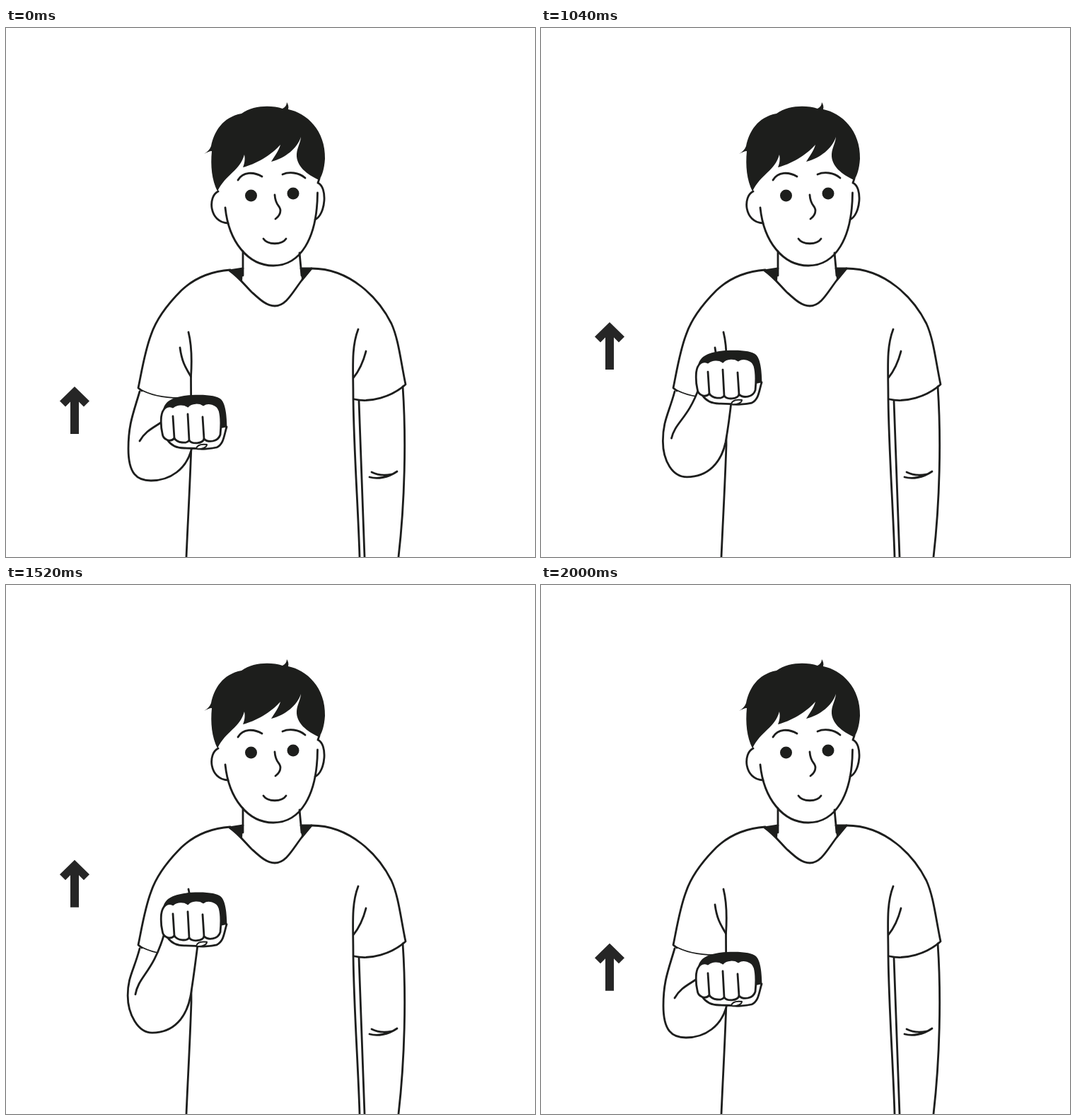
An HTML page for the animation above (3.04 s loop, 748 px wide and 748 px high).

```html
<!DOCTYPE html>
<html lang="en">
<head>
<meta charset="utf-8">
<title>Raising a fist</title>
<style>
  html, body { margin: 0; width: 100%; height: 100%; overflow: hidden; background: #fff; }
  svg { display: block; width: 100%; height: 100%; }
  .line { fill: none; stroke: #1d1e1d; stroke-width: 2.8; stroke-linecap: round; stroke-linejoin: round; }
  .white { fill: #fff; }
  .ink { fill: #1d1e1c; }
  .thin { stroke-width: 1.6; }
</style>
</head>
<body>
<svg viewBox="0 0 748 748">
  <!-- head -->
  <g class="line">
    <path d="M300 231C285 238 287 275 314 276"/>
    <path d="M443 213L441 219C455 225 452 264 437 271"/>
    <path d="M310 254C315 302 342 336 378 336C416 336 440 298 440.500 233"/>
    <path d="M328 215C335 203 350 203 362 210M391 207C400 203 414 204 423 212"/>
    <path d="M380 236C381 252 388 251 388 258C388 264 385 267 381 270"/>
    <path d="M364 298C370 307 390 307 396 298"/>
    <path d="M335 316V350M415 318L418 350"/>
  </g>
  <g class="ink">
    <path d="M280 178C285 175 288 172 290 167C294 147 306 126 333 121C350 109 375 109 391 114C395 112 397 109 397 105C399 108 400 111 399 115C425 120 452 145 451 185C450 200 447 208 443 215C425 207 410 195 411 178C412 168 416 164 417 154C412 170 395 184 375 189C380 181 386 173 388 165C375 180 352 193 335 197C338 190 338 184 337 179C331 202 311 206 299 231C291 215 289 195 291 174C288 174 284 176 280 178Z"/>
    <circle cx="346.500" cy="237" r="8.500"/>
    <circle cx="406" cy="234" r="8.500"/>
    <path d="M316 343L335 340L334 358C328 352 322 347 316 343ZM417 339L432 340L418 357Z"/>
  </g>

  <!-- shirt and resting arm -->
  <g class="line">
    <path d="M335 340L316 343C330 353 338 364 347 373C358 383 368 393 380 393C396 393 405 374 418 357L432 340H417"/>
    <path d="M317 342C290 344 266 354 248 371C228 391 212 413 205 434C196 458 192 485 187 509L192 513"/>
    <path d="M432 340C487 340 527 382 545 418C555 440 558 470 565 504C545 522 515 530 493 525"/>
    <path d="M498 426C488 452 491 480 491 525C492 600 498 680 500 748M509 457C505 473 499 485 491 495"/>
    <path d="M499 527L507 748M561 507C566 580 564 670 555 748"/>
    <path d="M514 635C525 638 540 636 553 627M517 628C525 632 535 633 545 631"/>
    <path d="M258 430C263 450 263 470 261.500 493L262 590C260 650 257 700 255 748"/>
    <path d="M246 452C249 475 256 483 261.500 493"/>
    <path class="thin" d="M188 510C200 517 220 523 245 523"/>
  </g>

  <!-- moving arm -->
  <path id="skin" class="white"/>
  <path id="limb" class="line"/>
  <g id="fist">
    <path class="line white" d="M228 582C233 590 240 594 252 594L268 594.500C275 596 290 595 298 593C308 588 308 577 312 564L303 560H235Z"/>
    <path class="ink" d="M222 541C224 528 235 521 262 519C285 518 298 520 304 525C311 532 312 550 312.500 564L304 566L290 545H230Z"/>
    <path class="line white" d="M219.500 550C221 538 228 532 236 536C242 531 252 531 257 535C262 529 274 529 279 533C285 528 299 531 302 541C305 552 304 565 303 575C300 585 286 587 280 581C278 588 263 589 259 583C256 588 242 587 238 580C233 586 222 583 221 573C219 565 219 557 219.500 550Z"/>
    <path class="line" d="M236 549L238 580M257 546L259 583M278 550L280 581"/>
    <path class="line white" style="stroke-width:2" d="M269 595C270 590 276 588 284 589C284 593 277 596 269 595Z"/>
  </g>

  <path id="arrow" fill="#262626" d="M97 507L118 527.500L110 535.500L103 528.500V574H91V528.500L84 535.500L76 527.500Z"/>
</svg>
<script>
const LOOP = 3040, TICK = 80;
const FIST_RISE = 103, ARROW_RISE = 132;
const REACH = 98; // fist height at which the forearm stands fully raised

const el = id => document.getElementById(id);
const skin = el('skin'), limb = el('limb'), fist = el('fist'), arrow = el('arrow');

const soft = u => Math.sin(u * Math.PI / 2) ** 2;
const steep = u => u ** 3 * (10 - 15 * u + 6 * u * u);
const span = (t, from, to) => Math.min(1, Math.max(0, (t - from) / (to - from)));
const lift = (node, dy) => node.setAttribute('transform', `translate(0 ${-dy})`);

// k is 0 with the forearm at rest and 1 with it raised
function drawArm(k) {
  const crease = `${222 + 2 * k} ${556 - 73 * k}C${207 + k} ${566 - 21 * k}`
    + ` ${197 - 11 * k} ${570 - 20 * k} ${189 - 7 * k} ${584 - 6 * k}`;
  const elbow = `189 514C${180 + k} 545 ${173 - k} ${560 - 7 * k} ${173 - k} ${595 - 17 * k}`
    + `S${185 + 2 * k} ${640 - 8 * k} ${205 + 2 * k} ${640 - 8 * k}`;
  const wrist = `C${234 + 4 * k} ${640 - 8 * k} ${254 + k} ${622 - 12 * k} 261 ${600 - 22 * k}`
    + `Q${265 + k} ${587 - 42 * k} ${264 + 9 * k} ${580 - 90 * k}`;
  skin.setAttribute('d', `M${crease}L189 535L${elbow}${wrist}Z`);
  limb.setAttribute('d', `M${crease}M${elbow}${wrist}`);
}

function draw(time) {
  const t = Math.floor(time % LOOP / TICK) * TICK;
  const fistY = FIST_RISE * (soft(span(t, 720, 1280)) - soft(span(t, 1340, 1980)));
  const arrowY = ARROW_RISE * (steep(span(t, 720, 1250)) - steep(span(t, 1345, 2045)));
  drawArm(fistY / REACH);
  lift(fist, fistY);
  lift(arrow, arrowY);
}

const began = performance.now();
function frame() {
  draw(performance.now() - began);
  requestAnimationFrame(frame);
}
frame();
</script>
</body>
</html>
```
